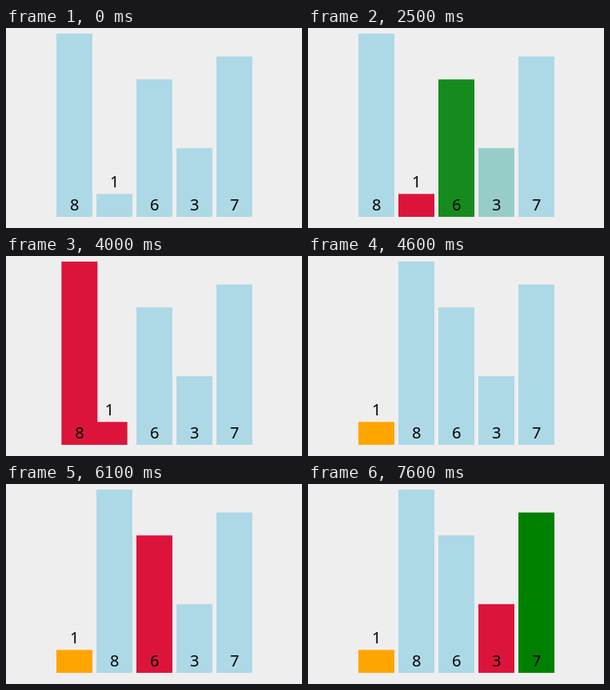
These frames come from a looping animation (370x251 px, 8 s). An HTML page:

```html
<!DOCTYPE html>
<html lang="en">
<head>
<meta charset="utf-8">
<title>Selection sort</title>
<style>
  html, body { margin: 0; width: 100%; height: 100%; overflow: hidden; background: #eee; }
  svg { display: block; width: 370px; height: 251px; }
  text { font: 20px "Segoe UI", "Open Sans", "Noto Sans", sans-serif; text-anchor: middle; fill: #000; }
</style>
</head>
<body>
<svg id="stage" viewBox="0 0 370 251"></svg>
<script>
const LOOP = 8000, TICK = 100;
const LEFT = 63, PITCH = 50, WIDTH = 45, BASE = 237, UNIT = 28.75;
const values = [8, 1, 6, 3, 7];

// b: idle, r: current minimum, g: being compared, o: sorted
const colors = { b: [173, 216, 230], r: [220, 20, 60], g: [0, 128, 0], o: [255, 165, 0] };

// Eased progress on successive ticks
const quick = [0.5, 1], slow = [0.127, 0.909, 1], late = [0.237, 0.96];

// Start time, color of each bar (in the order of values), progress, bars swapped afterwards
const steps = [
  [0, "bbbbb", [1], 0],
  [600, "rbbbb", quick, 0],
  [1100, "rgbbb", quick, 0],
  [1500, "brbbb", slow, 0],
  [2100, "brgbb", quick, 0],
  [2500, "brbgb", slow, 0],
  [3000, "brbbg", late, 0],
  [3500, "rrbbb", quick, 0],
  [4000, "rrbbb", slow, 1],
  [4500, "bobbb", quick, 1],
  [5000, "robbb", quick, 1],
  [5500, "rogbb", quick, 1],
  [6000, "borbb", quick, 1],
  [6500, "borgb", quick, 1],
  [7000, "bobrb", quick, 1],
  [7500, "bobrg", quick, 1]
];

const stage = document.getElementById("stage");

function add(parent, tag, attrs) {
  const el = document.createElementNS("http://www.w3.org/2000/svg", tag);
  for (const key in attrs) el.setAttribute(key, attrs[key]);
  return parent.appendChild(el);
}

const bars = values.map(value => {
  const group = add(stage, "g", {});
  const height = value * UNIT;
  const rect = add(group, "rect", { y: BASE - height, width: WIDTH, height });
  const labelY = value === 1 ? BASE - 37 : BASE - 8;
  add(group, "text", { x: WIDTH / 2 + 0.25, y: labelY }).textContent = value;
  return { group, rect };
});

const mix = (a, b, p) => a + (b - a) * p;

function slot(i, swapped) {
  return swapped && i < 2 ? 1 - i : i;
}

function draw(time) {
  let n = steps.length - 1;
  while (steps[n][0] > time) n--;
  const [start, next, curve, swapped] = steps[n];
  const [, prev, , wasSwapped] = steps[Math.max(n - 1, 0)];
  const p = curve[Math.min(Math.floor((time - start) / TICK), curve.length - 1)];

  bars.forEach(({ group, rect }, i) => {
    const x = LEFT + PITCH * mix(slot(i, wasSwapped), slot(i, swapped), p);
    const to = colors[next[i]];
    const rgb = colors[prev[i]].map((c, k) => Math.round(mix(c, to[k], p)));
    group.setAttribute("transform", `translate(${x} 0)`);
    rect.setAttribute("fill", `rgb(${rgb})`);
  });
}

const origin = performance.now();

function frame() {
  draw((performance.now() - origin) % LOOP);
  requestAnimationFrame(frame);
}
frame();
</script>
</body>
</html>
```
